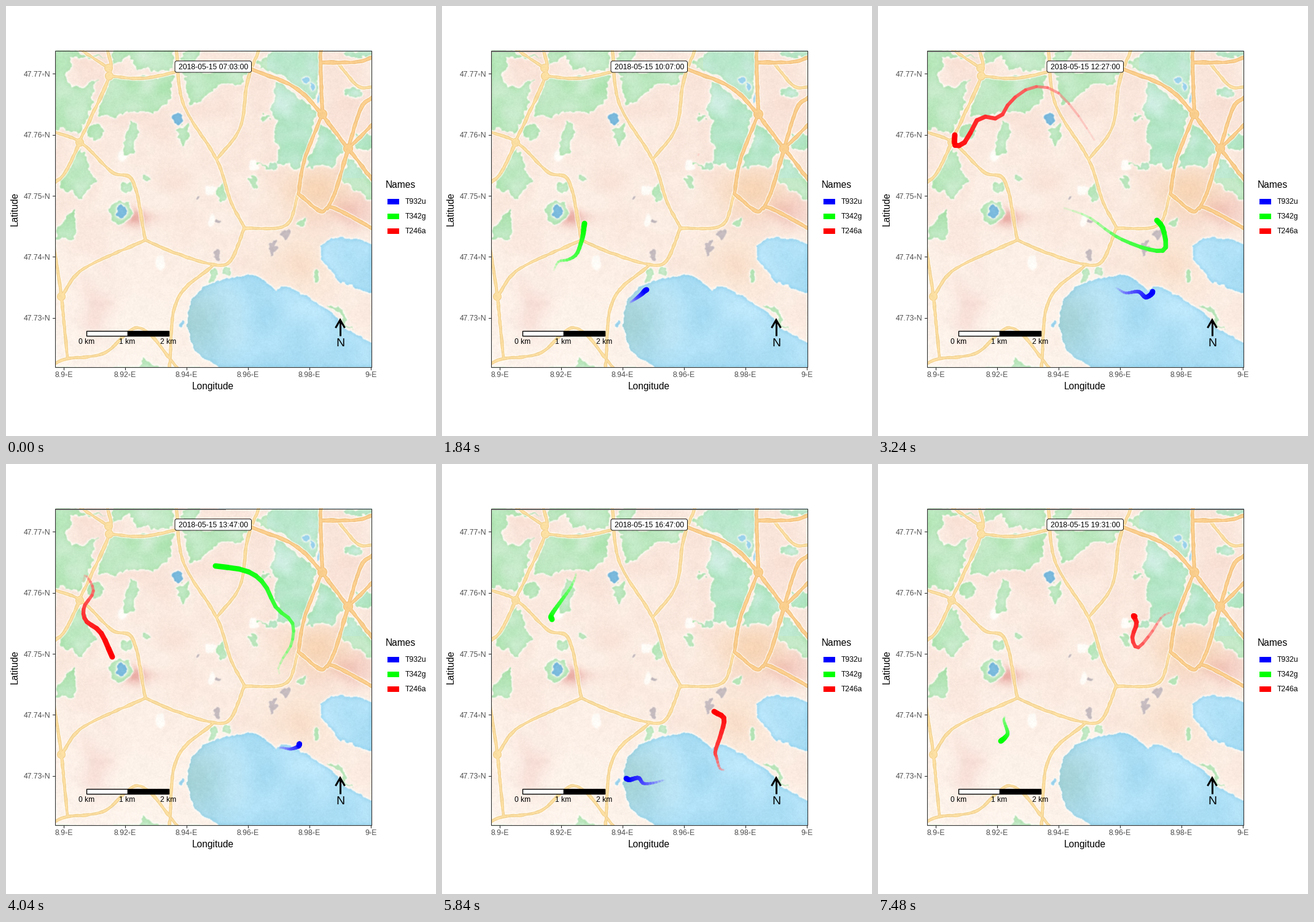
These frames come from a looping animation (700x700 px, 7.52 s). A matplotlib script:

```python
import numpy as np
import matplotlib.pyplot as plt
from matplotlib.animation import FuncAnimation
from matplotlib.collections import LineCollection
from matplotlib.patches import FancyBboxPatch, Rectangle
from matplotlib.path import Path

FRAMES, STEP = 188, 40
TAIL = 19
X0, X1, Y0, Y1 = 80, 596, 72, 588
PT = 0.72  # points per pixel at 100 dpi
rng = np.random.default_rng(7)
plt.rcParams["font.family"] = "Liberation Sans"


def spline(x, xp, fp):
    """Smooth curve through the points fp at the positions xp."""
    xp, fp = np.asarray(xp, float), np.asarray(fp, float)
    m = np.gradient(fp, xp, axis=0)
    i = np.clip(np.searchsorted(xp, x, "right") - 1, 0, len(xp) - 2)
    h = (xp[i + 1] - xp[i])[:, None]
    u = (x - xp[i])[:, None] / h
    v = 1 - u
    return (v * v * ((1 + 2 * u) * fp[i] + u * h * m[i])
            + u * u * ((1 + 2 * v) * fp[i + 1] - v * h * m[i + 1]))


# ---------- watercolour map ----------
SIZE = X1 - X0
X, Y = np.meshgrid(np.arange(X0, X1) + 0.5, np.arange(Y0, Y1) + 0.5)
FREQ2 = np.fft.fftfreq(SIZE)[:, None] ** 2 + np.fft.rfftfreq(SIZE) ** 2


def blur(a, s):
    p = np.fft.rfft2(a) * np.exp(-2 * np.pi ** 2 * s * s * FREQ2)
    return np.fft.irfft2(p, a.shape)


def noise(s):
    a = blur(rng.normal(size=(SIZE, SIZE)), s)
    return a / a.std()


ripple = [noise(6) + 0.6 * noise(2) for _ in "xy"]


def area(polys=(), spots=(), wobble=1.5):
    wx, wy = X + wobble * ripple[0], Y + wobble * ripple[1]
    grid = np.column_stack([wx.ravel(), wy.ravel()])
    mask = np.zeros(X.shape, bool)
    for p in polys:
        mask |= Path(p).contains_points(grid).reshape(X.shape)
    for x, y, rx, ry in spots:
        mask |= np.hypot((wx - x) / rx, (wy - y) / ry) < 1
    return mask.astype(float)


def roads(lines, width):
    depth = np.full(X.shape, -9.0)
    for pts in lines:
        n = len(pts)
        c = spline(np.linspace(0, n - 1, 10 * n), np.arange(n), pts)
        for a, b in zip(c[:-1], c[1:]):
            lo = np.maximum(np.minimum(a, b) - 9 - (X0, Y0), 0).astype(int)
            hi = np.maximum(np.maximum(a, b) + 9 - (X0, Y0), 0).astype(int)
            s = np.s_[lo[1]:hi[1], lo[0]:hi[0]]
            d, px, py = b - a, X[s] - a[0], Y[s] - a[1]
            u = np.clip((px * d[0] + py * d[1]) / (d @ d + 1e-9), 0, 1)
            dist = np.hypot(px - u * d[0], py - u * d[1])
            depth[s] = np.maximum(depth[s], width / 2 - dist)
    return depth


LAKES = [
    [(294, 517), (303, 475), (322, 457), (355, 445), (397, 439), (420, 446),
     (440, 464), (446, 456), (470, 463), (520, 492), (556, 527), (600, 552),
     (600, 592), (350, 592), (308, 563)],
    [(600, 390), (570, 378), (530, 379), (512, 390), (514, 412), (540, 447),
     (600, 468)],
]
PONDS = [(281, 187, 7, 9), (188, 335, 8, 9)]
POOLS = [(491, 121, 5, 5), (498, 132, 3, 6), (513, 149, 3, 5), (286, 515, 3, 5)]
NORTH_WOODS = [
    [(76, 68), (158, 84), (97, 84), (104, 130), (150, 124), (118, 208), (76, 197)],
    [(172, 119), (274, 114), (268, 150), (242, 176), (200, 172), (147, 180)],
    [(172, 68), (276, 68), (270, 108), (214, 104), (200, 82), (174, 96)],
    [(287, 106), (392, 106), (386, 125), (350, 130), (300, 165)],
    [(405, 92), (445, 70), (512, 68), (506, 152)],
    [(440, 124), (505, 170), (480, 262), (447, 257), (433, 160)],
]
OTHER_WOODS = [
    [(515, 190), (551, 226), (530, 264), (488, 262)],
    [(558, 246), (600, 292), (600, 318), (544, 282)],
    [(120, 232), (150, 286), (122, 316), (110, 300), (86, 291)],
    [(108, 330), (116, 378), (83, 379), (88, 358)],
    [(203, 192), (216, 191), (208, 242), (193, 242)],
    [(410, 255), (440, 252), (447, 263)],
    [(522, 487), (540, 488), (565, 527)],
    [(213, 592), (225, 575), (250, 592)],
]
GROVES = [(145, 206, 15, 12), (188, 336, 18, 17), (354, 305, 10, 16),
          (198, 296, 9, 9), (291, 208, 8, 13), (402, 288, 5, 11),
          (481, 351, 6, 8), (568, 140, 14, 8), (588, 218, 22, 12),
          (580, 78, 30, 8), (337, 438, 7, 10), (359, 433, 7, 8),
          (228, 277, 4, 6), (423, 182, 5, 4), (504, 442, 4, 9),
          (300, 80, 14, 10)]
BARE = [(253, 417, 5, 12), (332, 299, 9, 8), (190, 243, 7, 9), (405, 258, 6, 9),
        (333, 350, 6, 10)]
GREY = [(343, 404, 7, 9), (457, 371, 6, 8), (435, 392, 4, 9), (314, 313, 3, 3),
        (346, 352, 3, 3)]
MINOR = [
    [(165, 70), (168, 114), (120, 220)],
    [(120, 70), (165, 100)],
    [(168, 114), (230, 117), (330, 96), (400, 103)],
    [(78, 205), (122, 222), (172, 270), (207, 286), (227, 381)],
    [(120, 222), (97, 270), (78, 289)],
    [(227, 381), (126, 428), (90, 473)],
    [(227, 381), (275, 402), (338, 421), (366, 414), (388, 361)],
    [(388, 362), (455, 357), (476, 305)],
    [(388, 361), (366, 318), (343, 250), (289, 160), (277, 70)],
    [(343, 250), (381, 198), (393, 124), (412, 70)],
    [(338, 421), (278, 480), (266, 590)],
    [(78, 390), (90, 473), (100, 573)],
    [(78, 583), (100, 574), (160, 565), (218, 524), (280, 590)],
    [(540, 92), (572, 130), (598, 132)],
]
MAJOR = [
    [(400, 103), (480, 140), (557, 232), (598, 285)],
    [(515, 176), (486, 250), (476, 306)],
    [(476, 306), (512, 334), (532, 328), (598, 363)],
    [(557, 232), (537, 300), (523, 330)],
    [(515, 176), (512, 90), (513, 70)],
    [(512, 92), (570, 91), (598, 83)],
    [(557, 232), (598, 192)],
    [(598, 148), (578, 166), (557, 232)],
]

img = np.empty((SIZE, SIZE, 3))
img[:] = (252, 238, 228)


def blend(colour, weight):
    global img
    w = np.clip(weight, 0, 1)[..., None]
    img = img * (1 - w) + np.asarray(colour) * w


def glow(x, y, rx, ry):
    return np.exp(-((X - x) / rx) ** 2 - ((Y - y) / ry) ** 2)


def wash(mask, colour, rim, halo=0.85):
    """Paint a filled area with a pale halo and a darker rim."""
    blend((255, 253, 248), halo * np.clip(3.2 * blur(mask, 2.2), 0, 1))
    body = blur(mask, 0.8)
    blend(colour, body)
    blend(rim, body * np.clip(1 - blur(mask, 3.5), 0, 1) * 0.75)


mottle = noise(14)
blend((249, 224, 213), 0.3 + 0.18 * mottle - (Y - 300) / 700)
blend((254, 246, 239), (Y - 330) / 300 * np.clip((430 - X) / 200, 0, 1))
blend((228, 150, 143), (0.7 + 0.3 * mottle) * (
    0.8 * glow(205, 345, 38, 14) + 0.25 * glow(150, 480, 25, 70)
    + 0.35 * glow(560, 340, 50, 28)))
blend((246, 208, 172), 0.8 * glow(505, 300, 55, 40) + 0.35 * glow(480, 420, 55, 55))

wash(area(spots=BARE), (255, 253, 249), (253, 248, 242), 0.3)
green = np.array([192, 233, 196]) + noise(9)[..., None] * (7, 2, 7)
green += ((X > 425) & (Y < 280))[..., None] * np.array([-5, -1, 10])
wash(area(NORTH_WOODS + OTHER_WOODS, GROVES, 2.2), green, (160, 216, 155))

lakes = area(LAKES, wobble=1)
water = np.array([176, 225, 247]) + noise(16)[..., None] * (6, 3, 2)
wash(lakes, water, (105, 190, 226))
blend((160, 206, 206), lakes * 0.75 * glow(305, 515, 55, 60))
wash(area(spots=PONDS), (128, 190, 224), (92, 165, 208))
wash(area(spots=POOLS), (160, 215, 240), (140, 200, 230))
wash(area(spots=GREY, wobble=2.5), (203, 193, 196), (180, 172, 180), 0.2)

for lines, width, colour, rim, hubs in (
        (MINOR, 5, (252, 224, 163), (243, 207, 140),
         [(120, 222), (167, 101), (168, 114), (90, 473)]),
        (MAJOR, 6, (251, 208, 143), (243, 190, 120), [(515, 176), (557, 232)])):
    depth = roads(lines, width) + 0.3 * noise(3)
    for x, y in hubs:
        depth = np.maximum(depth, width + 2 - np.hypot(X - x, Y - y))
    blend((255, 250, 238), 0.6 * np.clip(depth + 2.2, 0, 1))
    blend(rim, np.clip(depth + 0.5, 0, 1))
    blend(colour, np.clip(depth - 0.6, 0, 1))
img += (1.6 * noise(0.8) + 0.8 * noise(3))[..., None]
img = np.clip(img, 0, 255).astype(np.uint8)


# ---------- tracks ----------
def track(*legs):
    """Each leg: its first step, then points spread evenly over its length."""
    steps, pts = [], []
    for start, *leg in legs:
        span = TAIL if len(leg) > 1 else 0
        steps += list(np.linspace(start, start + span, len(leg)))
        pts += leg
    frames = np.arange(steps[0], steps[-1] + 1)
    return int(steps[0]), spline(frames, steps, pts)


blue = track(
    (0, (300, 489)),
    (27, (306, 483), (316, 476), (325, 469), (333, 462)),
    (62, (388, 459), (403, 467), (424, 465), (436, 474), (447, 465)),
    (82, (446, 463), (463, 464), (476, 460), (477, 458)),
    (107, (470, 493), (455, 518), (425, 526), (402, 519), (378, 521), (361, 516)),
    (127, (361, 515), (345, 519), (328, 520), (320, 511), (306, 514), (300, 512)),
    (158, (299, 511)))
green = track(
    (0, (200, 450)),
    (27, (182, 430), (190, 416), (205, 413), (219, 404), (227, 383), (230, 370),
     (232, 354)),
    (62, (303, 329), (342, 343), (374, 366), (399, 381), (440, 396), (467, 396),
     (465, 366), (454, 349)),
    (82, (445, 341), (450, 318), (465, 292), (466, 258), (440, 234), (420, 195),
     (391, 174), (341, 166)),
    (107, (229, 152), (226, 140), (208, 148), (209, 164), (217, 177)),
    (127, (218, 178), (210, 200), (193, 224), (178, 246), (179, 253)),
    (168, (206, 411), (205, 418), (211, 437), (207, 445), (200, 451)))
red = track(
    (45, (417, 243)), (46, (418, 241)),
    (62, (352, 218), (325, 177), (290, 139), (252, 132), (217, 154), (197, 182),
     (165, 182), (143, 220), (126, 227), (125, 210)),
    (82, (126, 190), (135, 188), (142, 209), (127, 233), (130, 255), (154, 274),
     (173, 314)),
    (107.9, (222, 412), (297, 468), (353, 500), (406, 521), (450, 527),
     (475, 505), (474, 476), (468, 486), (465, 496), (459, 498)),
    (127, (459, 498), (452, 495), (447, 478), (445, 467), (454, 440), (459, 414),
     (443, 403)),
    (168, (479, 241), (462, 249), (444, 276), (423, 299), (414, 283), (421, 260),
     (416, 248), (418, 248)))
TRACKS = [("T932u", (0, 0, 1), blue), ("T342g", (0, 1, 0), green),
          ("T246a", (1, 0, 0), red)]

# ---------- stage ----------
fig = plt.figure(figsize=(7, 7), dpi=100, facecolor="white")
ax = fig.add_axes([0, 0, 1, 1])
ax.axis("off")
ax.imshow(img, extent=(X0, X1, Y1, Y0), interpolation="nearest", aspect="auto")
ax.set(xlim=(0, 700), ylim=(700, 0))


def text(x, y, s, size=12.2, color="black", ha="center", va="baseline", **kw):
    return ax.text(x, y, s, fontsize=size * PT, color=color, ha=ha, va=va, **kw)


def line(xs, ys, width=1.1, color="#333333", **kw):
    ax.plot(xs, ys, lw=width * PT, color=color, **kw)


def box(x, y, w, h, **kw):
    return ax.add_patch(Rectangle((x, y), w, h, **kw))


trails = []
text(618, 296, "Names", 15.5, ha="left")
for k, (name, rgb, (start, path)) in enumerate(TRACKS):
    box(620.5, 313.7 + 24 * k, 19.5, 8.8, fc=rgb, lw=0)
    text(650, 322.3 + 24 * k, name, ha="left")
    lc = ax.add_collection(LineCollection([], capstyle="round", zorder=3))
    trails.append((lc, start, path, np.array(rgb, float)))

bar = box(X0, 72.5, 0, 2, fc="#999999", lw=0, zorder=4)
box(79.5, 72.5, 515.5, 515.5, fill=False, ec="#333333", lw=1.1 * PT, zorder=5)

for k in range(5):
    y = 110.3 + 99.3 * k
    line([76, 79.5], [y, y])
    text(72, y + 4.6, f"47.{77 - k}◦N", color="#4d4d4d", ha="right")
for k in range(6):
    x = 94 + 100 * k
    line([x, x], [588, 591.5])
    text(x, 604.5, f"{8.9 + 0.02 * k:.4g}◦E", color="#4d4d4d")
text(337, 624, "Longitude", 15.5)
text(14.5, 330, "Latitude", 15.5, va="center", rotation=90)

for x, fc in ((131, "white"), (197.5, "black")):
    box(x, 529, 67, 7.8, fc=fc, ec="black", lw=1.4 * PT, zorder=6)
for k in range(3):
    text(131 + 66.5 * k, 550, f"{k} km", 12, zorder=6)
arrow = dict(width=3, color="black", zorder=6, solid_capstyle="butt",
             solid_joinstyle="miter")
line([544, 544], [537, 511], **arrow)
line([536.5, 544, 551.5], [524, 511, 524], **arrow)
text(544, 554, "N", 19.5, zorder=6)

ax.add_patch(FancyBboxPatch((275, 89.5), 124.5, 18.5, fc="white", ec="black",
                            boxstyle="round,pad=0,rounding_size=3",
                            lw=0.9 * PT, zorder=6))
clock = text(337.3, 103.2, "", 12.3, zorder=7)


def update(i):
    minutes = 7 * 60 + 3 + 4 * i
    clock.set_text(f"2018-05-15 {minutes // 60:02d}:{minutes % 60:02d}:00")
    bar.set_width(515 * i / (FRAMES - 1))
    for lc, start, path, rgb in trails:
        p = path[max(i - TAIL - start, 0):max(i - start + 1, 0)]
        n = max(len(p) - 1, 0)
        lc.set_segments([p[k:k + 2] for k in range(n)])
        if n:
            k = np.arange(n)
            white = ((TAIL - 1 - k) / (TAIL + 15))[:, None]
            alpha = np.minimum(1, 0.2 + 0.1 * k)[:, None]
            lc.set_linewidths((3 + 5.9 * k / (TAIL - 1)) * PT)
            lc.set_color(np.hstack([rgb + (1 - rgb) * white, alpha]))
    return [clock, bar] + [t[0] for t in trails]


anim = FuncAnimation(fig, update, frames=FRAMES, interval=STEP,
                     repeat=True, repeat_delay=0, blit=False)
plt.show()
```
